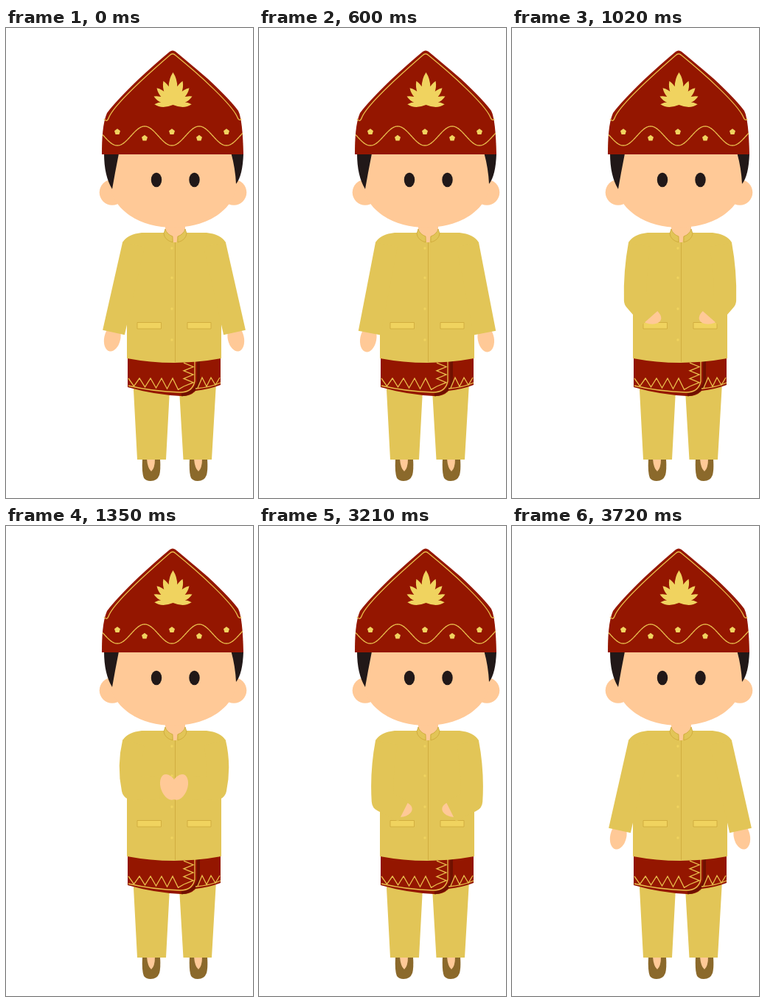
Recreate the animation shown at these times as an HTML page. Size 335x636 px, loop 3750 ms.

```html
<!DOCTYPE html>
<html lang="en">
<head>
<meta charset="utf-8">
<title>Greeting</title>
<style>
  html, body { margin: 0; height: 100%; overflow: hidden; background: #fff; }
  svg { display: block; width: 100%; height: 100%; }
  .red { fill: #941600; }
  .skin { fill: #ffc997; }
  .hair { fill: #211818; }
  .cloth { fill: #e2c557; }
  .gold { fill: #f0d35f; }
  .line { fill: none; stroke: #e9bd4c; stroke-width: 1.3; }
  .seam { stroke: #cda83a; stroke-width: .8; }
  #sleeve { fill: none; stroke: #e2c557; stroke-width: 30.5; stroke-linejoin: round; }
</style>
</head>
<body>
<svg viewBox="0 0 335 636">
  <defs>
    <g id="shoe">
      <path fill="#8b692b" d="M185 583Q184 602 187 609Q190 613 196 613Q205 613 208 605Q210 598 209 583Z"/>
      <path class="skin" d="M191 583H202Q202 596 197 600Q192 596 191 583Z"/>
    </g>
    <path id="collar" class="cloth seam" d="M216 272Q218 279 226 282V290Q215 287 214 278Z"/>
  </defs>

  <use href="#shoe"/>
  <use href="#shoe" x="64"/>
  <path class="cloth" d="M172.500 480L178 584H217L222 490ZM235 490L240.500 584H279L285 480Z"/>

  <path class="red" d="M165 444H291V483Q275 489 257 491Q250 499 237 498Q200 496 165 486Z"/>
  <path fill="none" stroke="#6f1000" stroke-width="4" d="M261 451V479Q257 494 238 496.500"/>
  <path class="line" d="M256 451V478Q253 493 236 493Q200 492 166 484M257 488Q278 486 291 480"/>
  <path class="line" id="zigzag"/>

  <path class="cloth" d="M216 277H184Q165 279 158 290L164 320V447Q228 459 292 447V320L298 290Q291 279 272 277H243Z"/>
  <path class="seam" d="M229.500 289V452"/>
  <g class="gold">
    <circle cx="225" cy="298" r="1.700"/><circle cx="225" cy="338" r="1.700"/>
    <circle cx="225" cy="380" r="1.700"/><circle cx="225" cy="422" r="1.700"/>
    <path class="seam" d="M178 398.500H210.500V407H178ZM246 398.500H278V407H246Z"/>
  </g>

  <path class="skin" d="M216 262H243V272Q240 280 232.500 282L231.500 290H227L226 282Q219 280 216 272Z"/>
  <use href="#collar"/>
  <use href="#collar" transform="matrix(-1 0 0 1 459 0)"/>

  <g id="arm">
    <ellipse id="hand" class="skin" rx="11" ry="18"/>
    <path id="sleeve"/>
  </g>
  <use href="#arm" transform="matrix(-1 0 0 1 456 0)"/>

  <g class="skin">
    <circle cx="144" cy="222.500" r="17.300"/>
    <circle cx="309" cy="222.500" r="17.300"/>
    <path d="M139 170V200C139 245 180 270 227 270S315 245 315 200V170Z"/>
  </g>
  <path class="hair" d="M133 170H153Q148 195 144 218Q133 200 133 170ZM305.500 170H322Q321 200 312 211Q311 190 305.500 170Z"/>
  <g class="hair">
    <ellipse class="eye" cx="204" cy="205.500"/>
    <ellipse class="eye" cx="255.500" cy="205.500"/>
  </g>

  <path class="red" d="M130 171C130 150 131 129 137 115Q148 100 179 70Q205 46 222 32Q226 29 230 32Q247 46 274 69Q304 97 315 112Q321 124 322 171Z"/>
  <path class="line" d="M133 123Q137 129 140 120C147 105 185 69 222 37Q226 33 230 37C268 68 305 103 313 119Q316 127 319 123"/>
  <path class="line" id="wave"/>
  <path class="gold" id="lotus"/>
  <path class="gold" id="flowers"/>
</svg>
<script>
const LOOP = 3750;
const $ = id => document.getElementById(id);
const mix = (a, b, k) => a + (b - a) * k;
const range = (from, to) => Array.from({ length: to - from + 1 }, (_, i) => from + i);
const polar = (x, y, r, a) => [x + r * Math.sin(a), y - r * Math.cos(a)];
const setPath = (id, d) => $(id).setAttribute('d', d);

function drawOrnaments() {
  setPath('wave', 'M' + range(131, 321).map(x => [x, 146 + 13 * Math.cos((x - 225) / 37 * Math.PI)]).join(' '));

  setPath('lotus', range(-4, 4).map(i => {
    const a = i * .385, length = i ? 38 - 3.2 * Math.abs(i) : 44;
    const side = s => polar(226.5, 104, length * .65, a + s * .42);
    return `M226.500 104Q${side(-1)} ${polar(226.5, 104, length, a)}Q${side(1)} 226.500 104`;
  }).join(''));

  setPath('flowers', range(-2, 2).map(i =>
    'M' + range(0, 4).map(k => polar(225 + 37 * i, i % 2 ? 149 : 140.5, 4.2, k * Math.PI * .4)).join(' ') + 'Z'
  ).join(''));

  const hem = range(0, 9).map(i => [166 + 7.5 * i, i % 2 ? 484 + i * .6 : 474]);
  const edge = range(0, 6).map(i => [i % 2 ? 254 : 241, 485 - 5.3 * i]);
  const flap = range(0, 5).map(i => [260 + 6 * i, i % 2 ? 473 : 487 - i]);
  setPath('zigzag', [[...hem, ...edge], flap].map(points => 'M' + points.join(' ')).join(''));
}

// Left arm: elbow x, y, wrist x, y, hand reach past the wrist, hand tilt, outward bow
const shoulder = [173, 293];
const straight = (x, y, tilt) => [(shoulder[0] + x) / 2, (shoulder[1] + y) / 2, x, y, 8, tilt, 0];
const rest = straight(146, 412, 12);
const swung = straight(154.4, 413.6, 8);
const bent = [168, 372, 196, 386, -7, -90, 5];
const joined = [172, 356, 208, 354, 13, -20, 7];

const keys = [
  [0, rest], [480, rest], [750, swung], [1090, bent], [1350, joined],
  [2790, joined], [3210, bent], [3720, rest], [LOOP, rest]
];

function poseAt(t) {
  const i = keys.findIndex(([end]) => t < end);
  const [t0, a] = keys[i - 1], [t1, b] = keys[i];
  return a.map((v, n) => mix(v, b[n], (t - t0) / (t1 - t0)));
}

function drawArm(t) {
  const [ex, ey, wx, wy, reach, tilt, bow] = poseAt(t);
  const [sx, sy] = shoulder;
  const k = reach / Math.hypot(wx - ex, wy - ey);
  setPath('sleeve', `M${sx} ${sy}Q${(sx + ex) / 2 - bow} ${(sy + ey) / 2} ${ex} ${ey}L${wx} ${wy}`);
  $('hand').setAttribute('transform', `translate(${wx + (wx - ex) * k} ${wy + (wy - ey) * k}) rotate(${tilt})`);
}

// Both blinks shrink the eyes and open them again
function drawEyes(t) {
  const half = 105;
  const away = Math.min(...[720, 2760].map(start => Math.abs(t - start - half)));
  const size = mix(.1, 1, Math.min(1, away / half));
  for (const eye of document.querySelectorAll('.eye')) {
    eye.setAttribute('rx', 7.2 * size);
    eye.setAttribute('ry', 9.8 * size);
  }
}

const start = performance.now();
function tick() {
  const t = (performance.now() - start) % LOOP;
  drawArm(t);
  drawEyes(t);
  requestAnimationFrame(tick);
}
drawOrnaments();
tick();
</script>
</body>
</html>
```
